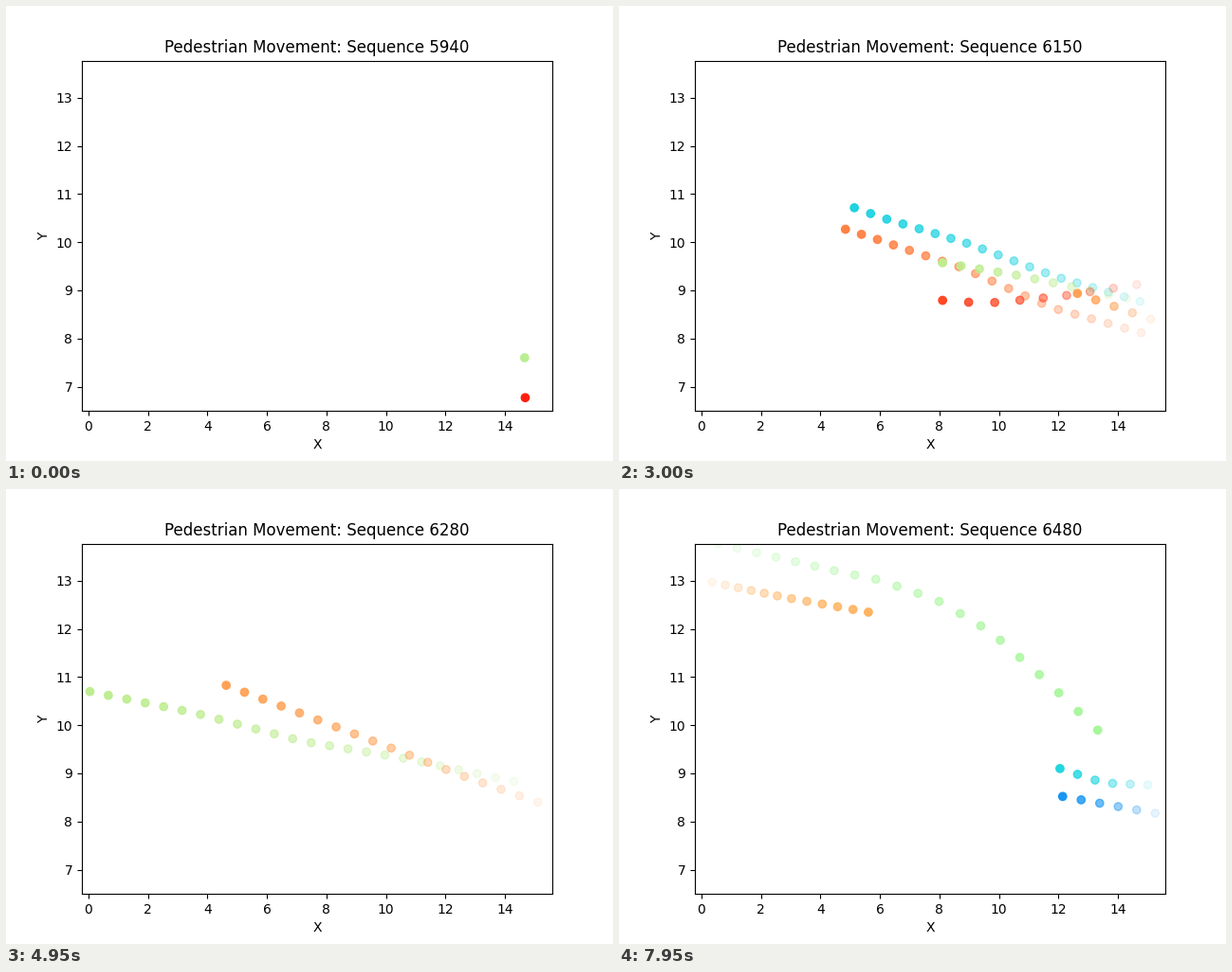
A matplotlib script that plays this animation: 640 by 480 pixels, repeating every 8000 ms.

```python
import matplotlib.pyplot as plt
import numpy as np
from matplotlib.animation import FuncAnimation

LOOP_MS, TICK_MS, STEP_MS = 8000, 50, 150

# (first step, last step): walkers as (rainbow position, x knots, y knots).
# Knots are spread evenly over the steps.
WALKS = {
    (0, 1): [(0.61, [14.66, 15.25], [7.6, 7.42]),
             (0.96, [14.68, 15.27], [6.77, 6.58])],
    (3, 30): [(0.31, [14.74, 7.59, 0.24], [8.77, 9.29, 9.96, 10.5, 11.15, 11.99]),
              (0.83, [14.78, 7.26, 0], [8.12, 8.64, 9.47, 10.08, 10.65, 11.33])],
    (11, 34): [(0.62, [14.3, 0.05], [8.83, 9.3, 9.67, 10.25, 10.7])],
    (13, 29): [(0.91, [14.63, 10.44, 5.77, 0.83],
                [9.12, 8.88, 8.73, 8.855, 8.92, 9.23])],
    (17, 34): [(0.78, [15.1, 4.63], [8.4, 8.97, 9.6, 10.22, 10.83])],
    (35, 54): [(0.58, [0.55, 4.68, 9.17, 13.32],
                [13.77, 13.52, 13.265, 13.02, 12.61, 11.92, 10.95, 9.9])],
    (35, 52): [(0.16, [3.82, 14.22], [9.62, 9.245, 8.93, 8.56, 7.75, 6.88])],
    (36, 53): [(0.42, [14.25, 0.28], [8.97, 9.45, 10.07, 10.42, 10.75])],
    (43, 54): [(0.75, [0.36, 2.77, 5.61], [12.97, 12.35])],
    (49, 54): [(0.2, [15.25, 12.14], [8.17, 8.52]),
               (0.32, [15, 12.05], [8.76, 8.8, 9.1])],
}


def trail(span, hue, xs, ys, step):
    """Positions walked so far and their colours, faint to solid."""
    past = np.arange(span[0], step + 1)
    colors = np.tile(plt.cm.rainbow(hue), (len(past), 1))
    if len(past) > 1:
        colors[:, -1] = np.linspace(0.1, 1, len(past))
    coords = [np.interp(past, np.linspace(*span, len(knots)), knots)
              for knots in (xs, ys)]
    return np.transpose(coords), colors


fig, ax = plt.subplots(figsize=(6.4, 4.8), dpi=100)
ax.set(xlim=(-0.22, 15.59), ylim=(6.494, 13.775), xlabel="X", ylabel="Y")
title = ax.set_title("")
dots = ax.scatter([], [])


def update(tick):
    step = tick * TICK_MS // STEP_MS
    step += step > 1  # nobody is present at step 2, so it is skipped
    trails = [trail(span, *walker, step)
              for span, walkers in WALKS.items() if span[0] <= step <= span[1]
              for walker in walkers]
    points, colors = map(np.concatenate, zip(*trails))
    dots.set_offsets(points)
    dots.set_facecolor(colors)
    dots.set_edgecolor(colors)
    title.set_text(f"Pedestrian Movement: Sequence {5940 + 10 * step}")
    return dots, title


anim = FuncAnimation(fig, update, frames=LOOP_MS // TICK_MS, interval=TICK_MS,
                     repeat=True)
plt.show()
```
